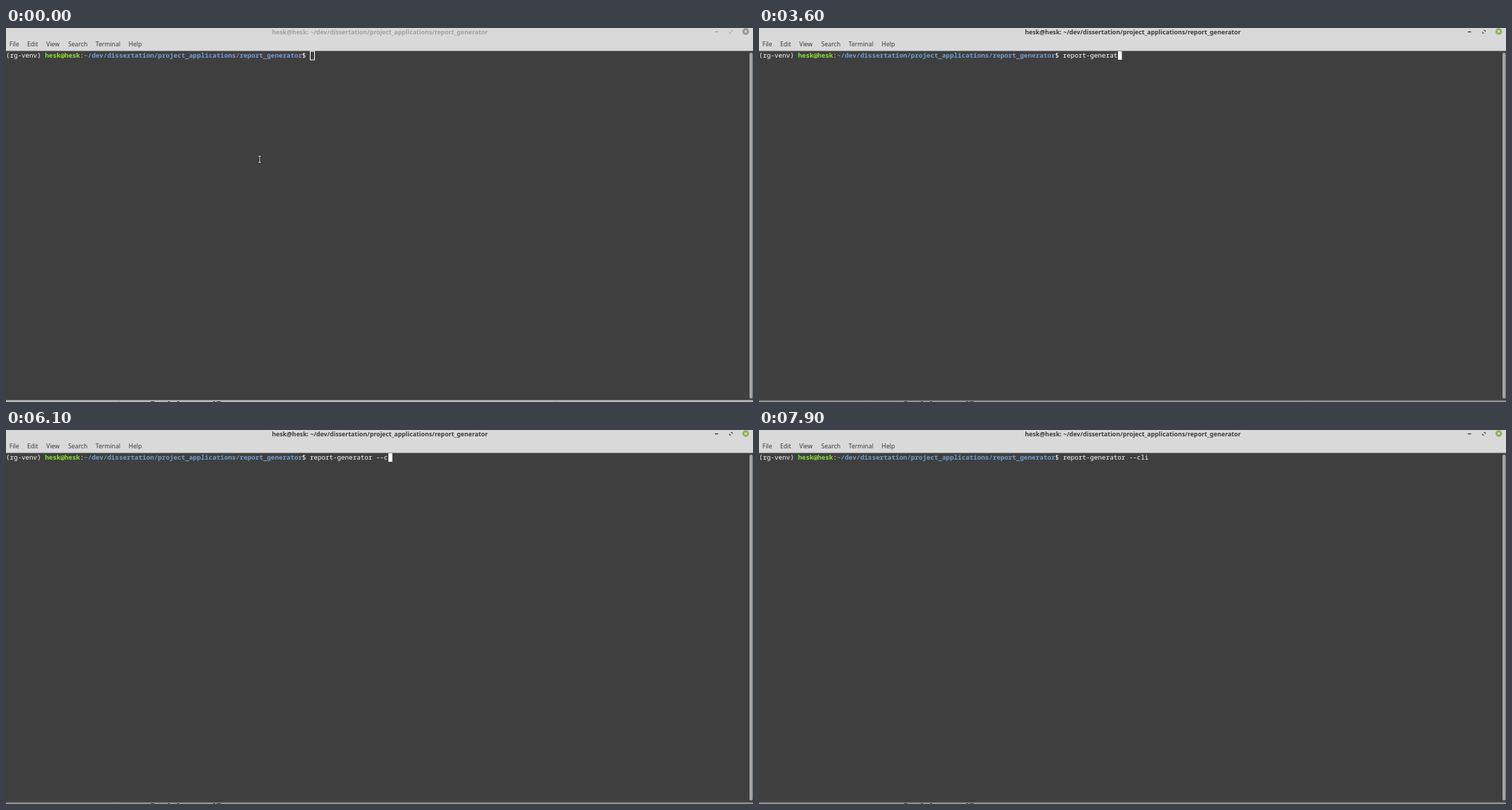
Animation, 1057 px wide and 530 px high, one loop 8 s. Source, as an HTML page:

```html
<!DOCTYPE html>
<html lang="en">
<head>
<meta charset="utf-8">
<title>Terminal</title>
<style>
  html, body { margin: 0; width: 100%; height: 100%; overflow: hidden; background: #fff; }
  svg { display: block; width: 1057px; height: 530px; }
  text { white-space: pre; }
  .ui { font: 8.6px "Noto Sans", sans-serif; fill: #3b3b3b; }
  #title { font-size: 8.78px; font-weight: 700; text-anchor: middle; }
  .mono { font: 9.2px "Noto Sans Mono", monospace; fill: #fff; }
  .user { font-weight: 700; fill: #8ae234; }
  .path { font-weight: 700; fill: #729fcf; }
  .tiny { font: 3.8px "Noto Sans", sans-serif; fill: #222; }
  .idle #title { fill: #a0a0a0; }
  .idle #controls { stroke: #9b9b9b; }
  .idle #close { fill: #969696; }
  .idle #shadow { opacity: .55; }
</style>
</head>
<body>
<svg id="stage" viewBox="0 0 1057 530">
  <defs>
    <linearGradient id="fade" x2="0" y2="1">
      <stop offset="0" stop-color="#2c2c2c"/>
      <stop offset="1" stop-color="#b4b4b4"/>
    </linearGradient>
  </defs>

  <!-- strip of the page below the window -->
  <rect y="526" width="1057" height="4" fill="#e4e4e4"/>
  <rect id="shadow" y="526" width="1057" height="4" fill="url(#fade)"/>
  <path d="M205 529.5h5M229 529.5h3M242 529.5h3M293 529.5h3M298 529.5h6" stroke="#444"/>
  <path d="M159.5 528v2M777.5 528v2" stroke="#999"/>

  <!-- window -->
  <rect width="1057" height="33" fill="#d9d9d9"/>
  <rect y="32.5" width="1057" height="494.5" fill="#3f3f3f"/>
  <rect x="1052" y="35" width="4.5" height="490" rx="2" fill="#a4a4a4"/>
  <text id="title" class="ui" x="529" y="9">hesk@hesk: ~/dev/dissertation/project_applications/report_generator</text>
  <g class="ui">
    <text x="4.8" y="26">File</text>
    <text x="30" y="26">Edit</text>
    <text x="57" y="26">View</text>
    <text x="88" y="26">Search</text>
    <text x="126.8" y="26">Terminal</text>
    <text x="173.6" y="26">Help</text>
  </g>
  <g id="controls" fill="none" stroke="#333">
    <path d="M1003 5.5h4.5" stroke-width="1.3"/>
    <path d="M1025.7 3.5h2v2M1023.9 5.3v2h2"/>
  </g>
  <circle id="close" cx="1046.7" cy="5" r="4.7" fill="#8bb158"/>
  <path d="M1045 3.3l3.4 3.4m0-3.4l-3.4 3.4" stroke="#fff"/>

  <text class="mono" x="0" y="42.2">(rg-venv) <tspan class="user">hesk@hesk</tspan>:<tspan class="path">~/dev/dissertation/project_applications/report_generator</tspan>$ <tspan id="typed"></tspan></text>
  <rect id="cursor" y="33" width="5.5" height="12" fill="#fff"/>
  <rect id="hollow" x="430.5" y="33" width="6" height="12.2" fill="none" stroke="#fff"/>
  <g id="pointer" fill="none">
    <path id="beam" d="M357 181.5h4M359 181.5v9M357 190.5h4" stroke="#222" stroke-width="2.4"/>
    <use href="#beam"/>
    <path d="M357 181.5h4M359 181.5v9M357 190.5h4" stroke="#ddd"/>
  </g>

  <!-- page showing through a half-drawn window -->
  <g id="tear">
    <rect x="92" y="40" width="90" height="8" fill="#3f3f3f"/>
    <path id="page" fill="#fff"/>
    <path d="M159.5 0V36M159 28.5H777.5M777.5 0V101" fill="none" stroke="#dcdfe3"/>
    <path d="M37 29.5h6" stroke="#ccc"/>
    <path d="M171 8.5h1.5M171 12h1.5M171 15.5h1.5M174.5 8.5h6.5M174.5 12h6.5M174.5 15.5h6.5" stroke="#57606a"/>
    <text x="192.8" y="14.7" font-family="Liberation Sans, sans-serif" font-size="9.7" font-weight="700" fill="#24292f">README.md</text>
    <path d="M181 29h102v8h-102zM549 33h62v3.5h-62z" fill="#3f3f3f"/>
    <path d="M285.5 29v7M367.5 29v7M370.5 29v7M374.5 29v7" stroke="#ddd"/>
    <path d="M545.5 29v7.5" stroke="#333" stroke-width="1.5"/>
    <path d="M548.5 29v7.5" stroke="#aaa"/>
    <g class="tiny">
      <text x="241" y="31.5" fill="#fff">done</text>
      <text x="182" y="36" fill="#ddd">(rg-venv) <tspan fill="#8ae234">hesk@hesk:</tspan><tspan fill="#729fcf">~/dev/dissertation/project_app</tspan></text>
      <text x="182" y="32" fill="#8ae234">report_generator --cli</text>
      <text x="309" y="32.5" font-weight="700">Experimental methods</text>
      <text x="362" y="32.5">17</text>
      <text x="299" y="37" font-weight="700">2 Conclusions</text>
      <text x="362" y="37">21</text>
      <text x="398" y="32.5">Additions</text>
      <text x="521" y="32.5">19</text>
      <text x="400" y="36.5">Tables</text>
      <text x="521" y="36.5">21</text>
    </g>
    <path d="M416 32h103M414 36h105" stroke="#888" stroke-width=".6" stroke-dasharray="1 1"/>
  </g>
</svg>
<script>
const LOOP = 8000, LEFT = 430.7, CELL = 5.52;
const COMMAND = "report-generator --cli ";

// [time, characters typed]; a smaller count is a backspace
const KEYS = [
  [0, 0], [800, 1], [900, 2], [1200, 3], [1300, 4], [1400, 5], [1600, 6], [2000, 7],
  [2200, 8], [2400, 10], [2500, 11], [2700, 12], [2800, 13], [3000, 15], [3600, 14],
  [3800, 15], [3900, 16], [4900, 17], [5200, 18], [5300, 19], [6100, 20], [6300, 21],
  [6400, 23], [6900, 22], [7400, 23]
];
const BLINKS = [[4500, 4900], [5900, 6100], [7900, 8000]];

const $ = id => document.getElementById(id);
const show = (id, on) => $(id).setAttribute("visibility", on ? "visible" : "hidden");
const within = (t, [from, to]) => t >= from && t < to;

// Stepped lower edge of the page: each step is "x y", right to left
const steps = [[1057, 117], [1052, 119], [1031, 116], [1020, 119]];
for (let x = 888; x > 711; x -= 33.2) steps.push([x, 101], [x - 11, 102]);
steps.push([711, 87]);
[534, 512, 479, 446, 413, 396, 380, 363].forEach((x, i) =>
  steps.push([x, 69], [[523, 490, 457, 435, 402, 391, 369, 358][i], 72]));
steps.splice(-1, 1, [358, 58]);
steps.push([181, 41], [168, 43], [153, 47], [147, 43], [115, 41], [104, 43]);
$("page").setAttribute("d", "M0 0H1057" +
  steps.map(([x, y]) => `H${x}V${y}`).join("")
    .replace("H711V87", "H711V87H534") + "L92 42 80 36H0Z");

function draw() {
  const t = performance.now() % LOOP;
  const idle = t < 200;
  const count = KEYS.findLast(([time]) => t >= time)[1];
  $("stage").classList.toggle("idle", idle);
  $("typed").textContent = COMMAND.slice(0, count);
  $("cursor").setAttribute("x", LEFT + CELL * count);
  show("hollow", idle);
  show("cursor", !idle && !BLINKS.some(span => within(t, span)));
  show("pointer", t < 800);
  $("pointer").setAttribute("transform", `translate(0 ${t < 400 ? 0 : 4})`);
  show("tear", within(t, [6200, 6300]));
  requestAnimationFrame(draw);
}
draw();
</script>
</body>
</html>
```
